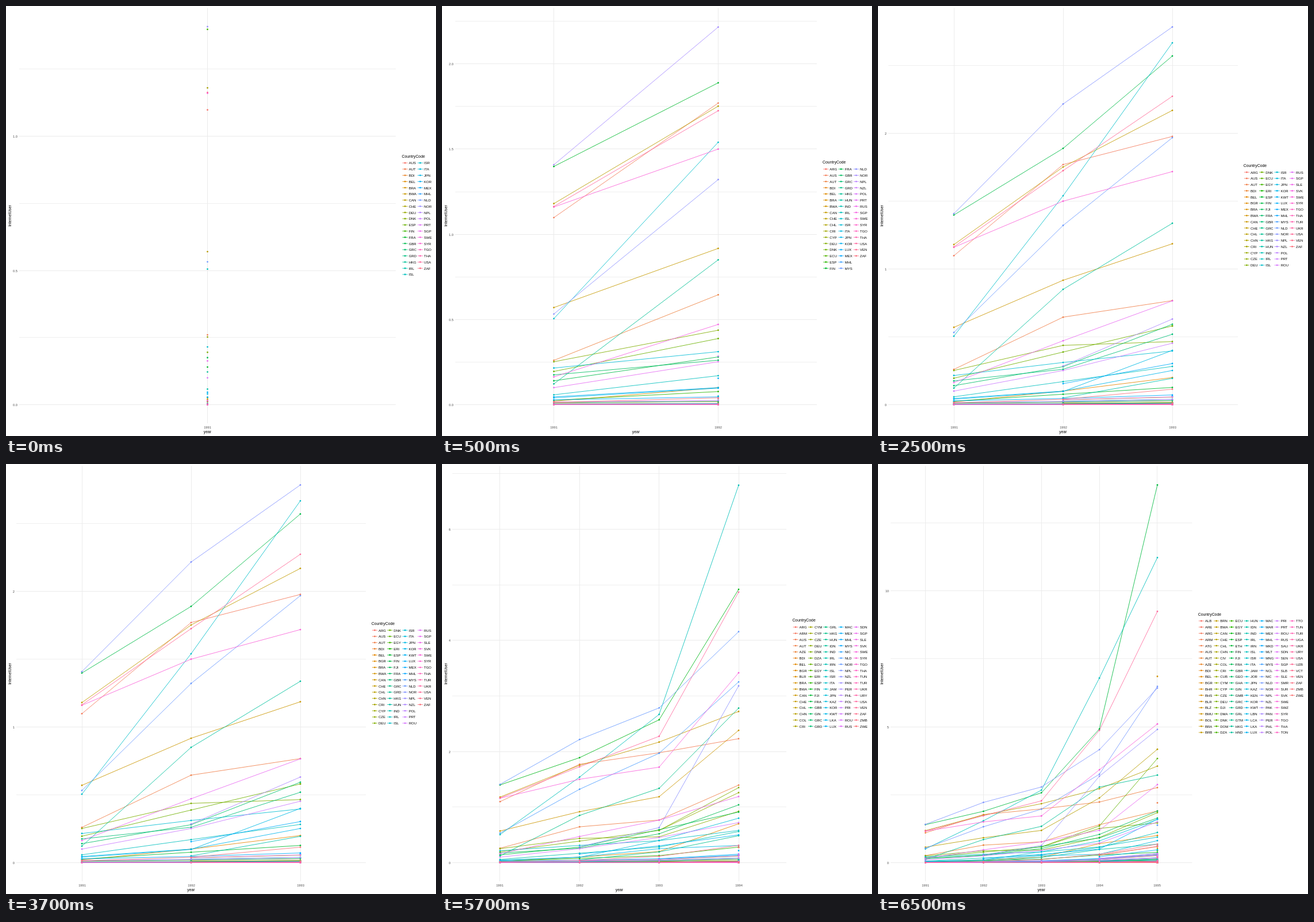
An HTML page for the animation above (8000 ms loop, 748 by 748 pixels).

```html
<!DOCTYPE html>
<html lang="en">
<head>
<meta charset="utf-8">
<title>InternetUser by year</title>
<style>
  html, body { margin: 0; width: 100%; height: 100%; overflow: hidden; background: #fff; }
  svg { display: block; width: 100%; height: 100%; }
  text { font-family: "Liberation Sans", Arial, sans-serif; }
  .tick { font-size: 5.7px; fill: #4d4d4d; }
  .title { font-size: 6.85px; }
  .key { font-size: 6px; }
  .end { text-anchor: end; }
  .mid { text-anchor: middle; }
  .major { stroke: #ebebeb; stroke-width: 1; }
  .minor { stroke: #ebebeb; stroke-width: .8; }
  .series { fill: none; stroke-width: .85; }
  /* Each chart is opaque and covers the one before it. */
  .chart { animation: 8s step-end infinite; }
  #y1992 { animation-name: show1992; }
  #y1993 { animation-name: show1993; }
  #y1994 { animation-name: show1994; }
  #y1995 { animation-name: show1995; }
  @keyframes show1992 { 0% { visibility: hidden } 6.25%, 100% { visibility: visible } }
  @keyframes show1993 { 0% { visibility: hidden } 31.25%, 100% { visibility: visible } }
  @keyframes show1994 { 0% { visibility: hidden } 56.25%, 100% { visibility: visible } }
  @keyframes show1995 { 0% { visibility: hidden } 81.25%, 100% { visibility: visible } }
</style>
</head>
<body>
<svg id="stage" viewBox="0 0 748 748" xmlns="http://www.w3.org/2000/svg"></svg>
<script>
const FIRST = 1991, BASE = 693.5, TOP = 3.5, BOTTOM = 726;

// Countries by the year in which they join
const joined = [
  `AUS AUT BDI BEL BRA BWA CAN CHE DEU DNK ESP FIN FRA GBR GRC GRD HKG IRL ISL
   ISR ITA JPN KOR MEX MHL NLD NOR NPL POL PRT SGP SWE SYR TGO THA USA ZAF`,
  `ARG CHL CRI CYP ECU HUN IND LUX MYS NZL RUS VEN`,
  `BGR CHN CZE EGY ERI FJI KWT ROU SLE SVK TUR UKR`,
  `ARM AZE BLR COL CYM DZA GIN GRL IDN IRN JAM KAZ LKA MAC NIC PAN PER PHL PRI
   SDN TUN URY ZMB ZWE`,
  `ALB ARE ATG BHR BHS BLZ BMU BOL BRB BRN CIV CUB DJI DMA DOM ETH GEO GHA GMB
   GTM HND JOR KEN LBN LCA MAR MKD MLT MNG NCL PAK SAU SEN SLB SMR SUR SWZ TON
   TTO UGA UZB VCT`
].map(s => s.trim().split(/\s+/));

// Leading series, from the joining year on
const leaders = {
  AUS: [1.098, 1.77, 1.977, 2.23, 2.76],
  AUT: [.26, .645, .767, 1.395, 1.9],
  BEL: [.02, .1, .2, .7, 1],
  CAN: [.57, .917, 1.186, 2.38, 4.17],
  CHE: [1.18, 1.752, 2.169, 2.72, 3.55],
  DEU: [.252, .437, .465, .925, 1.84],
  DNK: [.195, .388, .58, 1.35, 3.83],
  ESP: [.026, .077, .127, .28, .38],
  FIN: [1.398, 1.889, 2.57, 4.917, 13.89],
  FRA: [.14, .28, .593, .91, 1.64],
  GBR: [.175, .261, .519, 1.04, 1.9],
  HKG: [.122, .85, 1.337, 2.78, 3.22],
  IRL: [.058, .17, .282, .56, 1.11],
  ISL: [.505, 1.54, 2.667, 6.79, 11.22],
  ISR: [.215, .311, .396, .58, .94],
  JPN: [.04, .097, .4, .8, 1.59],
  KOR: [.046, .1, .252, .31, .81],
  NLD: [.532, 1.321, 1.968, 3.252, 6.48],
  NOR: [1.408, 2.216, 2.784, 4.155, 6.42],
  PRT: [.1, .252, .453, .72, 1.5],
  SGP: [.163, .471, .765, 1.19, 2.87],
  SWE: [1.16, 1.5, 1.718, 3.416, 5.1],
  USA: [1.163, 1.725, 2.273, 4.867, 9.24],
  ZAF: [.013, .04, .114, .31, .68],
  HUN: [.05, .194, .485, .68],
  LUX: [.155, .303, .5, 1.6],
  NZL: [.285, .631, 3.18, 4.9],
  CZE: [.58, 1.26, 1.46],
  ATG: [2.2], BMU: [6.85], NCL: [1.38]
};

// The rest stay close to zero: seeded share of a rising ceiling
const ceiling = [.055, .09, .14, .3, .65];

function seeded(code) {
  let h = 0x811C9DC5;
  for (const c of code) h = Math.imul(h ^ c.charCodeAt(0), 0x01000193);
  h = Math.imul(h ^ (h >>> 16), 0x85EBCA6B);
  h = Math.imul(h ^ (h >>> 13), 0xC2B2AE35);
  return ((h ^ (h >>> 16)) >>> 0) / 2 ** 32;
}

const series = joined.flatMap((codes, start) => codes.map(code => {
  const share = seeded(code) ** 4;
  const values = leaders[code] || ceiling.slice(start).map(c => c * share);
  return { code, start, values };
})).sort((a, b) => a.code < b.code ? -1 : 1);

// Evenly spaced hues at chroma 100, luminance 65 (polar LUV)
function hue(i, n) {
  const L = 65, C = 100, a = (15 + 360 * i / n) * Math.PI / 180;
  const Y = ((L + 16) / 116) ** 3;
  const u = C * Math.cos(a) / (13 * L) + .19784;
  const v = C * Math.sin(a) / (13 * L) + .46834;
  const X = 9 * Y * u / (4 * v), Z = 3 * Y / v - 5 * Y - X / 3;
  const rgb = [
    3.240479 * X - 1.53715 * Y - .498535 * Z,
    -.969256 * X + 1.875992 * Y + .041556 * Z,
    .055648 * X - .204043 * Y + 1.057311 * Z
  ].map(c => {
    const g = c > .00304 ? 1.055 * c ** (1 / 2.4) - .055 : 12.92 * c;
    return Math.round(255 * Math.min(1, Math.max(0, g)));
  });
  return `rgb(${rgb})`;
}

const snap = v => Math.floor(v) + .5;
const line = (x1, y1, x2, y2, attrs) =>
  `<line x1="${x1}" y1="${y1}" x2="${x2}" y2="${y2}" ${attrs}/>`;
const dot = (x, y, fill) =>
  `<circle cx="${x.toFixed(2)}" cy="${y.toFixed(2)}" r="1.4" fill="${fill}"/>`;
const label = (x, y, cls, str, more = "") =>
  `<text x="${x}" y="${y}" class="${cls}" ${more}>${str}</text>`;

function legend(shown, rows) {
  const cols = Math.ceil(shown.length / rows), top = 370 - (rows - 1) * 5.39;
  const left = 727 - 26.35 * (cols - 1);
  return label(left - 12.2, top - 9.3, "title", "CountryCode") +
    shown.map(({ code }, i) => {
      const x = left + 26.35 * Math.floor(i / rows), y = top + 10.78 * (i % rows);
      const color = hue(i, shown.length);
      return line(x - 11, y, x - 2, y, `class="series" stroke="${color}"`) +
        dot(x - 6.5, y, color) + label(x, y + 2.4, "key", code);
    }).join("");
}

function chart({ left, right, unit, step, digits, rows }, last) {
  const gap = (right - left) / (last + 1.2), mid = (left + right) / 2;
  const px = j => left + gap * (.6 + j), py = v => BASE - v * unit;
  const shown = series.filter(s => s.start <= last);
  let grid = "", lines = "", dots = "";

  for (let k = 0; py(k * step) > TOP; k++) {
    const y = snap(py(k * step)), major = k % 2 === 0;
    grid += line(left, y, right, y, `class="${major ? "major" : "minor"}"`);
    if (major) grid += label(left - 3, y + 2.4, "tick end", (k * step).toFixed(digits));
  }
  for (let j = 0; j <= last; j++) {
    const x = snap(px(j));
    grid += line(x, TOP, x, BOTTOM, 'class="major"') +
      label(x, 735, "tick mid", FIRST + j);
  }
  shown.forEach(({ start, values }, i) => {
    const color = hue(i, shown.length);
    const pts = values.slice(0, last - start + 1).map((v, j) => [px(start + j), py(v)]);
    const path = pts.map(p => p.map(c => c.toFixed(2))).join(" ");
    lines += `<polyline class="series" stroke="${color}" points="${path}"/>`;
    dots += pts.map(p => dot(...p, color)).join("");
  });

  return `<g class="chart" id="y${FIRST + last}">
    <rect width="748" height="748" fill="#fff"/>${grid}${lines}${dots}` +
    label(mid, 743.3, "title mid", "year") +
    label(0, 0, "title mid", "InternetUser", 'transform="translate(9.4 365) rotate(-90)"') +
    legend(shown, rows) + "</g>";
}

document.getElementById("stage").innerHTML = [
  { left: 23, right: 678, unit: 467, step: .25, digits: 1, rows: 19 },
  { left: 23, right: 652, unit: 296.4, step: .25, digits: 1, rows: 17 },
  { left: 18, right: 626, unit: 236, step: .5, digits: 0, rows: 16 },
  { left: 18, right: 599, unit: 96.7, step: 1, digits: 0, rows: 17 },
  { left: 22, right: 546.5, unit: 47.3, step: 2.5, digits: 0, rows: 19 }
].map(chart).join("");
</script>
</body>
</html>
```
